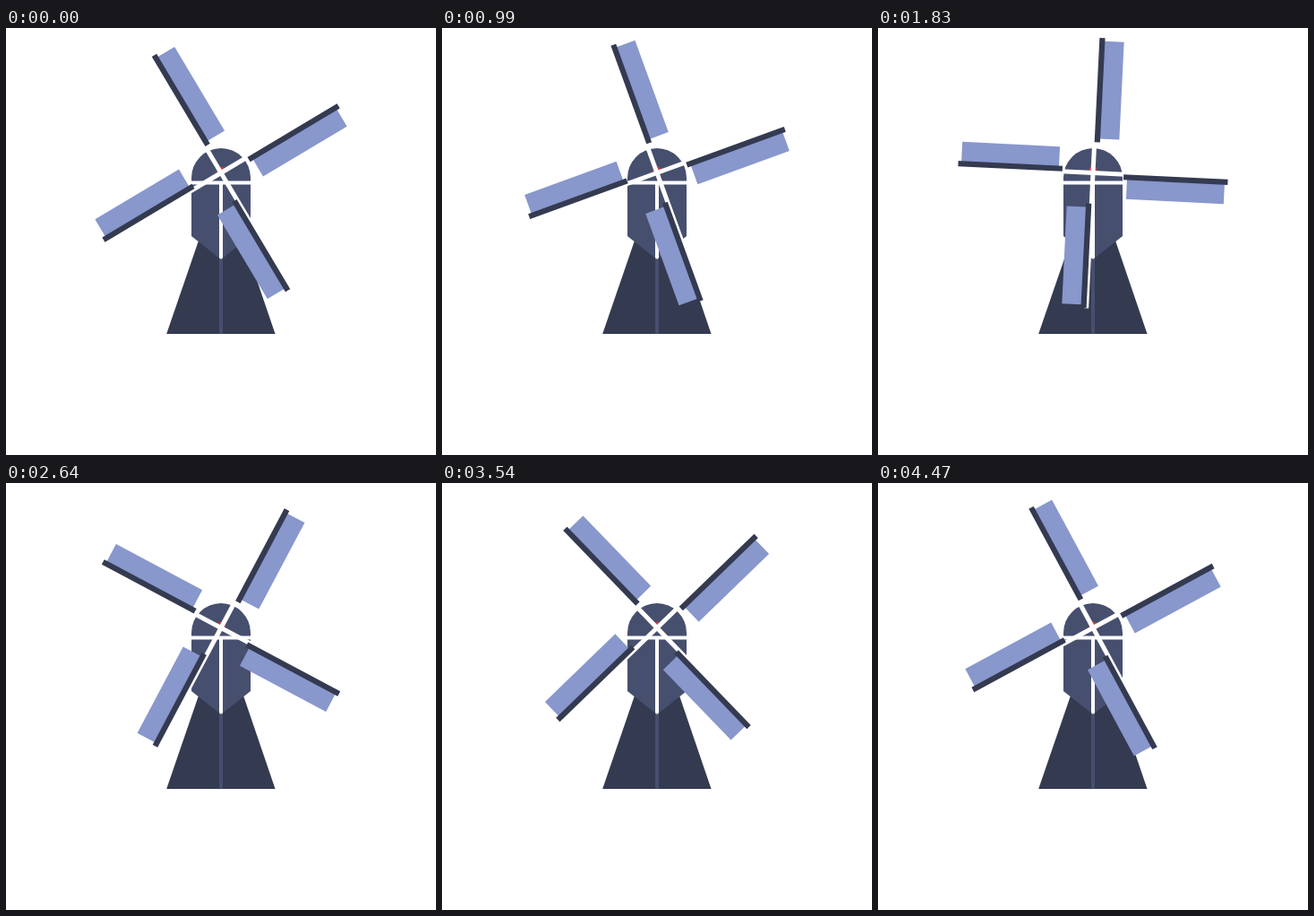
An HTML page for the animation above (4500 ms loop, 480 by 476 pixels).

```html
<!DOCTYPE html>
<html lang="en">
<head>
<meta charset="utf-8">
<title>Windmill</title>
<style>
  html, body { margin: 0; width: 100%; height: 100%; overflow: hidden; background: #fff; }
  svg { display: block; width: 100%; height: 100%; }
</style>
</head>
<body>
<svg viewBox="0 0 480 476">
  <defs>
    <g id="arm">
      <rect x="-2.5" y="-151" width="5" height="151" fill="#fff"/>
      <rect x="5.5" y="-147.3" width="22" height="109" fill="#8897cc"/>
      <rect x="0" y="-150.8" width="6.2" height="116.5" fill="#343a50"/>
    </g>
  </defs>
  <path d="M215 237H265L300.5 341H179.2Z" fill="#343a50"/>
  <path d="M207 167A33 33 0 0 1 273 167V232L240 258L207 232Z" fill="#474f6e"/>
  <path d="M240 256V340.5" stroke="#474f6e" stroke-width="4"/>
  <path d="M207 172.5H273" stroke="#fff" stroke-width="4"/>
  <path d="M240 173V255.5" stroke="#fff" stroke-width="4" stroke-linecap="round"/>
  <circle cx="240" cy="159.5" r="4.8" fill="#d6393f"/>
  <g id="sails"></g>
</svg>
<script>
  const LOOP = 4500, STEP = 30, START = -30.8;
  const sails = document.getElementById('sails');
  sails.innerHTML = [0, 90, 180, 270]
    .map(a => `<use href="#arm" transform="rotate(${a})"/>`).join('');

  function draw(ms) {
    const t = Math.floor((ms % LOOP) / STEP) * STEP;
    const angle = START - 360 * t / LOOP;
    sails.setAttribute('transform', `translate(240 161.5) rotate(${angle})`);
  }

  let begin;
  function tick(now) {
    begin ??= now;
    draw(now - begin);
    requestAnimationFrame(tick);
  }
  draw(0);
  requestAnimationFrame(tick);
</script>
</body>
</html>
```
